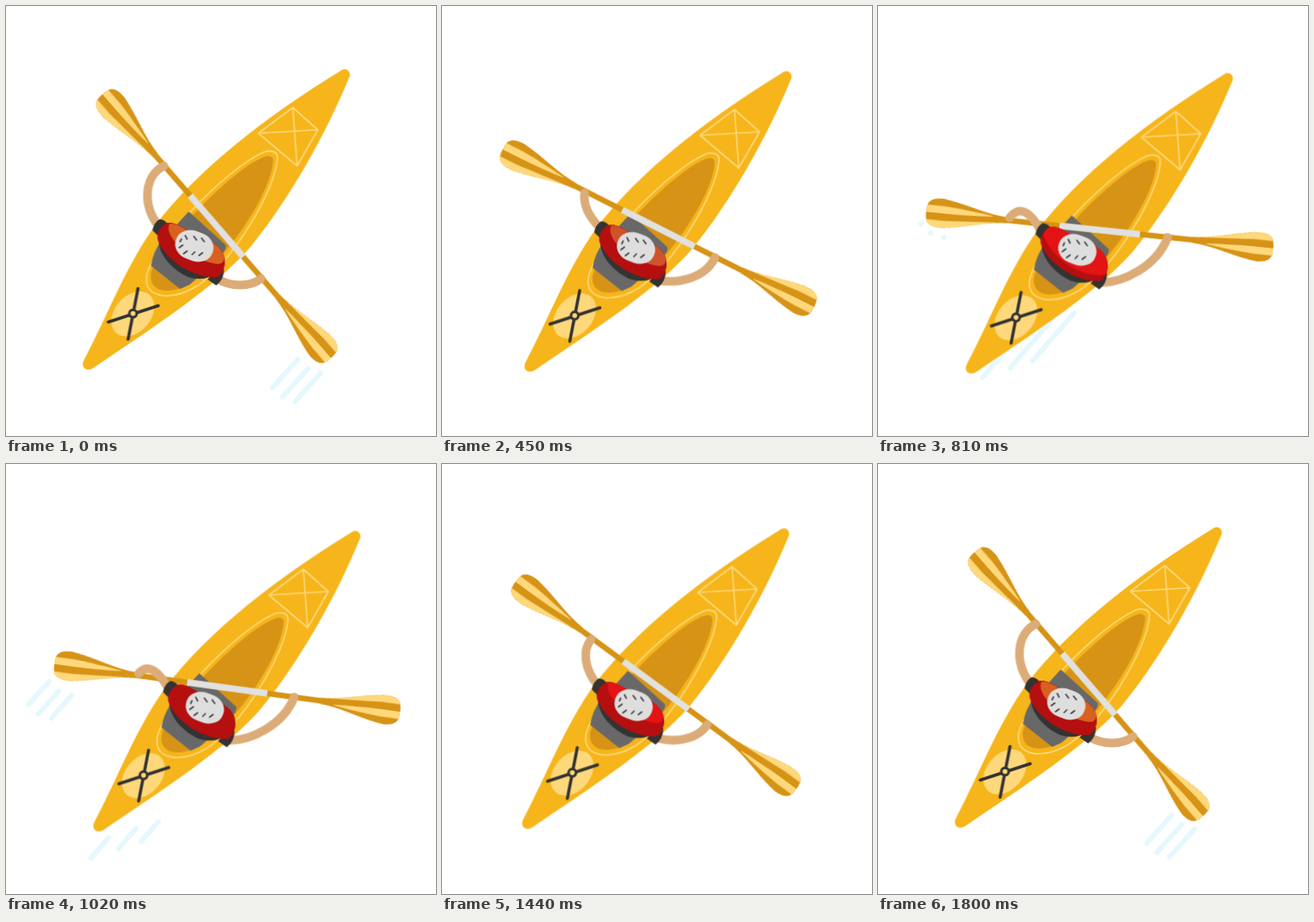
Animation of 500 by 500 pixels, one loop 1830 ms. Source, as an HTML page:

```html
<!DOCTYPE html>
<html lang="en">
<head>
<meta charset="utf-8">
<title>Kayak</title>
<style>
@property --head { syntax: "<number>"; inherits: true; initial-value: 0; }
@property --tail { syntax: "<number>"; inherits: true; initial-value: 0; }

:root {
  --loop: 1830ms;
  --sine: cubic-bezier(.37, 0, .63, 1);
  --yellow: #f6b51a;
  --ochre: #d69316;
  --cream: #ffd87b;
  --dark: #333;
  --red: #e41414;
  --deep: #b50f10;
}
html, body { margin: 0; width: 100%; height: 100%; overflow: hidden; background: #fff; }
svg { display: block; width: 100vw; height: 100vh; }

/* hull and paddle swing */
.boat { animation: drift var(--loop) var(--sine) infinite; }
.paddle { animation: stroke var(--loop) var(--sine) infinite; }
@keyframes drift {
  0%, .5%, 96.1%, 100% { transform: translate(-.5px, 0); }
  48.3% { transform: translate(12.5px, 4.6px); }
}
@keyframes stroke {
  0%, .5%, 96.1%, 100% { transform: translate(245.5px, 256px) rotate(49.1deg); }
  48.3% { transform: translate(245.5px, 256px) rotate(5.3deg); }
}

/* arms follow the shaft; each half swing is one half of the sine curve */
.arm { fill: none; stroke: #dcac78; stroke-width: 10; stroke-linecap: round; }
.left { animation: left var(--loop) infinite; }
.right { animation: right var(--loop) infinite; }
@keyframes left {
  0%, .5%, 96.1%, 100% { d: path("M184 186C162 197 158 230 178 256"); animation-timing-function: cubic-bezier(.37, 0, .685, .5); }
  24.4% { d: path("M160 214.5C158 228 165 243 178 256"); animation-timing-function: cubic-bezier(.315, .5, .63, 1); }
  48.3% { d: path("M140 242.5C152 227 165 234 177 257"); animation-timing-function: cubic-bezier(.37, 0, .685, .5); }
  72.2% { d: path("M160 214.5C158 228 165 243 178 256"); animation-timing-function: cubic-bezier(.315, .5, .63, 1); }
}
@keyframes right {
  0%, .5%, 96.1%, 100% { d: path("M246 317C262 327 284 327 297 317"); animation-timing-function: cubic-bezier(.37, 0, .685, .5); }
  24.4% { d: path("M247 317C268 320 300 315 311 290.5"); animation-timing-function: cubic-bezier(.315, .5, .63, 1); }
  48.3% { d: path("M248 317C272 317 312 298 325 263.5"); animation-timing-function: cubic-bezier(.37, 0, .685, .5); }
  72.2% { d: path("M247 317C268 320 300 315 311 290.5"); animation-timing-function: cubic-bezier(.315, .5, .63, 1); }
}

/* water streaks: the head runs out, then the tail catches up */
.water {
  animation: head var(--loop) var(--sine) infinite,
             tail var(--loop) var(--sine) infinite,
             show var(--loop) step-end infinite;
  animation-delay: var(--at);
}
.streak {
  fill: none; stroke: #e5f8fe; stroke-width: 6; stroke-linecap: round;
  stroke-dasharray: calc((var(--head) - var(--tail)) * 1px) 300px;
  stroke-dashoffset: calc(var(--tail) * -1px);
}
@keyframes head { 0% { --head: 0; } 20.5%, 100% { --head: 100; } }
@keyframes tail { 0%, 13.9% { --tail: 0; } 29.8%, 100% { --tail: 100; } }
@keyframes show { 0% { opacity: 1; } 29.8%, 100% { opacity: 0; } }

/* vest tones */
.mid { animation: mid var(--loop) step-end infinite; }
.top { animation: top var(--loop) step-end infinite; }
@keyframes mid {
  0%, 18%, 54.9%, 100% { fill: var(--deep); }
  5.7%, 34.4% { fill: var(--red); }
}
@keyframes top {
  0%, 88.5%, 100% { fill: #d9601f; }
  5.7%, 34.4%, 72.1% { fill: var(--red); }
  18% { fill: #cf532a; }
  54.9% { fill: var(--deep); }
}

.hull { fill: var(--yellow); }
.ochre { fill: var(--ochre); }
.cream { fill: var(--cream); }
.dark { fill: var(--dark); }
.deep { fill: var(--deep); }
.trim { fill: none; stroke: var(--cream); stroke-width: 1.7; stroke-linejoin: round; }
.strap { stroke: var(--dark); stroke-width: 3.6; stroke-linecap: round; }
.slots { fill: none; stroke: #444; stroke-width: 1.7; stroke-linecap: round; }
</style>
</head>
<body>
<svg viewBox="0 0 500 500">
  <defs>
    <g id="splash">
      <path class="streak" pathLength="100" d="M342 408l-35 39"/>
      <path class="streak" pathLength="100" d="M353.5 419l-35 39"/>
      <path class="streak" pathLength="100" d="M368.5 424l-35 39"/>
    </g>
    <g id="blade">
      <path class="ochre" d="M108 -3.3C135 -5 155 -13 180 -16.5C192 -18 200 -15 202 -9Q204 0 202 9C200 15 192 18 180 16.5C155 13 135 5 108 3.3Z"/>
      <path class="cream" d="M108 -3.3C135 -5 155 -13 180 -16.5C192 -18 200 -15 202 -9L202 -8.5L180 -8.5Q150 -6 108 -3.3Z"/>
      <path class="cream" d="M125 2.5Q150 .5 180 0H203Q203 4 202 8.5H180Q150 6.5 125 3Z"/>
    </g>
  </defs>

  <g class="water" style="--at: -1250ms">
    <path class="streak" pathLength="100" d="M170 376l-71 82"/>
    <path class="streak" pathLength="100" d="M202 365l-71 82"/>
    <path class="streak" pathLength="100" d="M228 357l-71 82"/>
  </g>
  <g class="water" style="--at: -305ms"><use href="#splash"/></g>
  <g class="water" style="--at: -1040ms"><use href="#splash" x="-292" y="-155"/></g>

  <g class="boat">
    <path class="hull" d="M91 412C120 357 140 302 174 255C222 192 300 130 390 75C396 71 402 76 400 82C372 150 330 225 284 281C245 326 170 375 102 421C94 426 87 420 91 412Z"/>
    <path class="trim" d="M334 118L363 144L339 186L294 148ZL339 186M294 148L363 144"/>

    <ellipse class="cream" rx="29.5" ry="21" transform="translate(148 358) rotate(-49)"/>
    <path class="strap" d="M154 328.5L142.5 387.5M119.5 367.5L177.5 348.5"/>
    <circle class="cream" cx="148.2" cy="357.6" r="4.3" stroke="#333" stroke-width="3"/>

    <path class="trim" d="M316 177C317 169 308 167 300 170C255 190 170 280 164 314C160 338 190 345 222 326C262 300 314 215 316 177Z"/>
    <path class="ochre" d="M311 181C312 174 306 173 299 176C258 194 174 284 169 312C167 332 190 338 218 321C258 294 308 218 311 181Z"/>
    <path fill="#686868" d="M213 239L256 278Q257 283 250 290L214 324L203 329L169 302Q172 285 180 275Z"/>

    <g class="paddle">
      <path class="ochre" d="M-115 -3.3H115V3.3H-115Z"/>
      <path fill="#e1e1e1" d="M-47 -3.8H47V3.8H-47Z"/>
      <use href="#blade"/>
      <use href="#blade" transform="rotate(180)"/>
    </g>

    <path class="arm left" d="M184 186C162 197 158 230 178 256"/>
    <path class="arm right" d="M246 317C262 327 284 327 297 317"/>

    <path class="dark" d="M178 268C176 285 190 305 212 315C222 318 230 318 237 315L240 300Z"/>
    <path class="dark" d="M179 248Q186 248 190 256L178 268L171 261Q172 252 179 248Z"/>
    <path class="dark" d="M235 318L245 325Q254 318 254 306L244 306Z"/>

    <path class="deep" d="M190 252C202 252 210 262 222 266S251 279 254 291C256 300 253 312 247 315C222 318 186 297 177 272C175 264 181 254 190 252Z"/>
    <path class="mid" d="M190 252C202 252 210 262 222 266S251 279 254 291C256 298 255 306 251 308C226 312 190 290 180 262C181 257 185 253 190 252Z"/>
    <path class="top" d="M191 253C202 252 210 262 222 266S251 279 254 291C255 296 252 300 247 300C225 298 195 280 190 262C189 257 190 254 191 253Z"/>

    <rect fill="#dedede" x="-22.5" y="-17" width="45" height="34" rx="19" ry="16" transform="translate(219.5 279) rotate(20)"/>
    <path class="slots" d="M203 274l1.5 -3M209 267l2 4M219 268l3 4M228 270l3 4M202 281l4 -3M207 288l4 -3M217 289l3 -3M225 290l4 -3"/>
  </g>
</svg>
</body>
</html>
```
